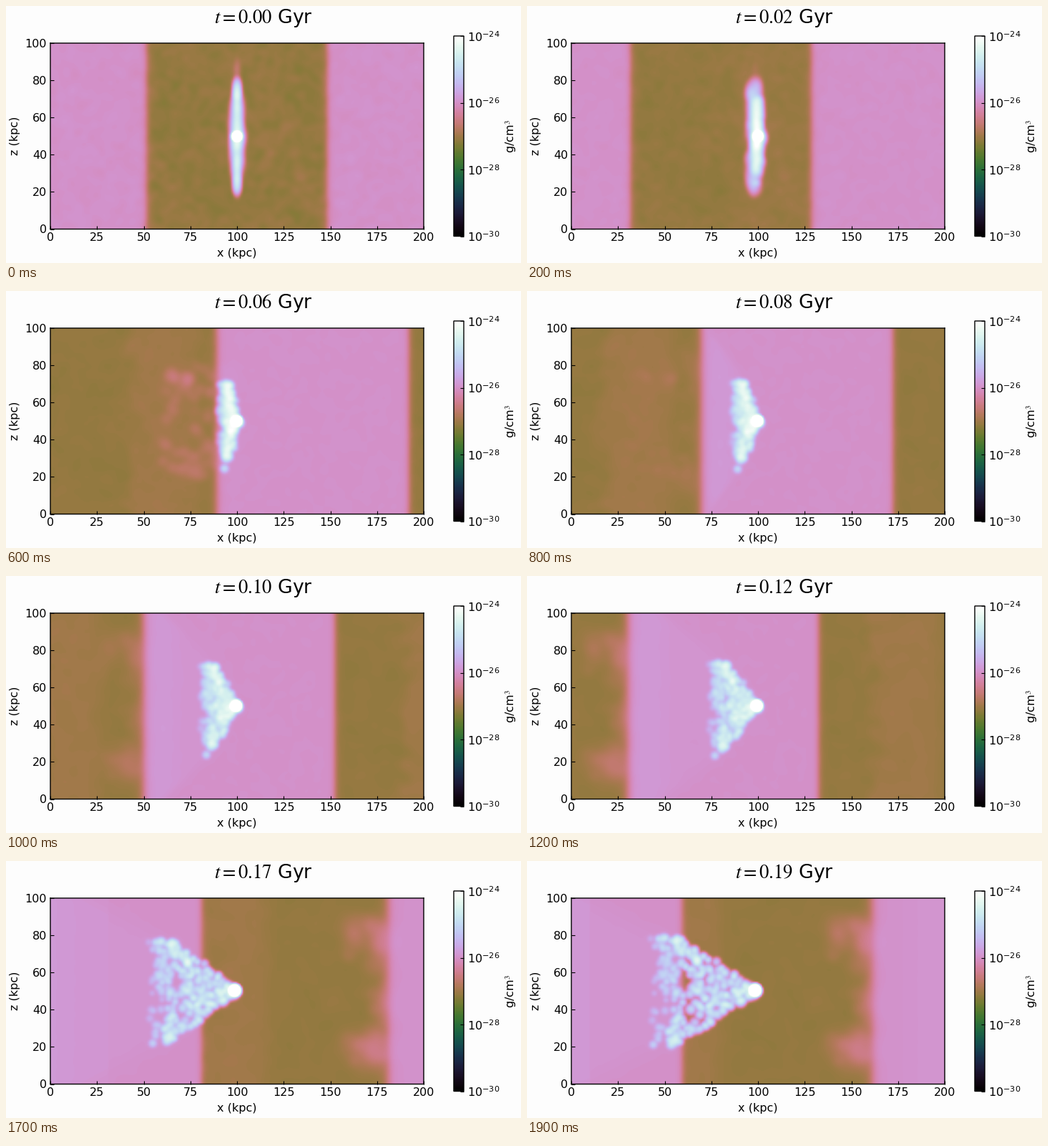
Write a matplotlib script that moves like this. It is 720x360 px and loops after 2 s.

```python
import numpy as np
import matplotlib.pyplot as plt
from matplotlib.animation import FuncAnimation
from matplotlib.cm import ScalarMappable
from matplotlib.colors import LogNorm

W, H, DPI = 720, 360, 100
FRAMES = 20
PINK, BROWN = -25.97, -27.1  # log10 densities of the two media

plt.rcParams.update({
    "font.family": "DejaVu Sans", "font.size": 11.5, "mathtext.fontset": "stix",
    "xtick.direction": "in", "ytick.direction": "in", "axes.linewidth": 1,
    "axes.labelpad": 4.5, "figure.facecolor": "#fdfdfd",
})

rng = np.random.default_rng(12)
xs = np.arange(200) + 0.5
zs = np.arange(100) + 0.5
X, Z = np.meshgrid(xs, zs)


def smooth_noise(passes):
    a = rng.normal(size=X.shape)
    for _ in range(passes):
        for axis in (0, 1):
            a = (np.roll(a, 1, axis) + a + np.roll(a, -1, axis)) / 3
    return a / a.std()


def step(v, width):
    return 0.5 * (1 + np.tanh(v / width))


def blobs(x, z, sx, sz, amp, wrap=False):
    """Sum of Gaussian clumps on the grid."""
    dx = xs - np.reshape(x, (-1, 1))
    if wrap:
        dx = (dx + 100) % 200 - 100
    dz = zs - np.reshape(z, (-1, 1))
    gx = np.exp(-0.5 * (dx / np.reshape(sx, (-1, 1))) ** 2)
    gz = np.exp(-0.5 * (dz / np.reshape(sz, (-1, 1))) ** 2)
    return (gz * np.reshape(amp, (-1, 1))).T @ gx


grain = smooth_noise(4)
mottle = smooth_noise(12)

# dense disc clumps
N = 260
h0 = 19.5 * rng.choice([-1, 1], N) * rng.random(N) ** 1.45
lag = rng.random(N) ** 1.3
x_off = rng.normal(0, 0.8, N)
size = rng.uniform(0.9, 1.3, N)
mass = rng.uniform(0.4, 1.6, N) * (1 - 0.85 * lag) * 1.1e-25

# outer gas that is stripped early
M = 90
out_h = rng.choice([-1, 1], M) * 28 * rng.random(M) ** 0.6
out_lag = rng.random(M)
out_mass = rng.uniform(0.5, 1.5, M) * 2.4e-26

# wisps ahead of the trailing edge: two long plumes and a short fringe
K = 90
plume = rng.random(K) < 0.55
wisp_z = np.where(plume, rng.choice([20, 80], K) + rng.normal(0, 5, K),
                  rng.uniform(14, 86, K))
wisp_x = 3 - np.where(plume, 24, 12) * rng.random(K) ** 1.4
wisp_s = rng.uniform(2.2, 4.8, K)


def medium(n):
    left = 51.5 - 9.9 * n - 4 * (n / 19) ** 6
    right = 148.3 - 9.85 * n
    mid, half = (left + right) / 2, (right - left) / 2
    c = (X - mid + 100) % 200 - 100
    brown = step(c + half, 1.9) - step(c - half, 1.9 + 0.06 * n)

    drift = np.roll(grain, -10 * n, axis=1)
    soft = np.roll(mottle, -10 * n, axis=1)
    c0 = 28 - 0.21 * n * n
    edge = c - c0 + 2 * soft
    warm = step(edge + 18, 4) - step(edge - 18, 4)
    low = BROWN + 0.1 * min(1, n / 4) * warm + 0.035 * drift * np.exp(-n / 4)
    low = low + 0.012 * soft

    # widening wake behind the disc
    front = 100 - 0.125 * n * n
    slope = 0.45 + 6 * np.exp(-n / 4)
    reach = 25 + (front - X) * slope
    wake = step(reach - np.abs(Z - 50), 3) * step(X - right - 2, 2)
    wake *= step(front - X, 3) * np.clip((n - 4) / 4, 0, 1)
    ridge = np.exp(-((X - right - 9 - 0.6 * (n - 8)) / (5 + 0.5 * n)) ** 2)
    high = PINK + 0.02 * drift * np.exp(-n / 5) + wake * (0.05 + 0.06 * ridge)
    high = high + 0.06 * np.clip((n - 14) / 5, 0, 1) * step(c - half - 18, 9)

    dens = 10 ** (low * brown + high * (1 - brown))
    gain = np.clip((n - 7) / 9, 0, 1)
    dens += blobs(right + wisp_x, wisp_z, wisp_s, wisp_s,
                  np.full(K, 2.8e-28 * gain), wrap=True)
    return dens


def galaxy(n):
    push = 0.125 * n * n
    u = np.abs(h0) / 20
    x = 100 + x_off - push * (u + (1 - u) * lag) - 0.6 * n * lag
    z = 50 + h0 * (1 + 0.0014 * n * n)
    start = min(1, n / 4)
    calm = 1 - start  # the disc is still smooth at first
    amp = mass * (0.12 + 0.88 * start) * (1 - 0.75 * calm * u ** 1.5)
    dens = blobs(x, z, size * (1 + 0.15 * calm), size * (1 + calm), amp)

    fade = np.exp(-0.7 * n)
    spread = np.full(M, 1 + 0.2 * min(n, 6))
    dens += blobs(100 - 1.1 * out_lag * n * n, 50 + out_h * (1 + 0.01 * n),
                  spread, spread * (1 + calm), out_mass * fade)
    dens += blobs(100 - 0.4 * n * n, 86, 1.2, 3.5, 1.2e-27 * fade)
    dens += blobs(100 - 0.152 * n * n - 0.3 * min(n, 4), 25 - 0.01 * n * n,
                  1.15, 1.15, 1.2e-25 * start / (1 + 0.05 * n))

    r = np.hypot(X - 100 + 0.0045 * n * n, Z - 50 - 0.025 * n)
    return dens + 1e-23 * np.exp(-(r / (2.3 + 0.018 * n)) ** 4)


def field(n):
    return np.log10(medium(n) + galaxy(n))


def box(x0, y0, x1, y1):
    return [x0 / W, 1 - y1 / H, (x1 - x0) / W, (y1 - y0) / H]


fig = plt.figure(figsize=(W / DPI, H / DPI), dpi=DPI)
ax = fig.add_axes(box(62, 52, 584, 312.5))
image = ax.imshow(field(0), origin="lower", extent=(0, 200, 0, 100),
                  aspect="auto", cmap="cubehelix", vmin=-30, vmax=-24,
                  interpolation="bilinear")
ax.set_xticks(range(0, 201, 25))
ax.set_yticks(range(0, 101, 20))
ax.set_xlabel("x (kpc)")
ax.set_ylabel("z (kpc)")

cax = fig.add_axes(box(626, 42, 640, 322.5))
bar = fig.colorbar(ScalarMappable(LogNorm(1e-30, 1e-24), "cubehelix"), cax=cax,
                   ticks=[1e-30, 1e-28, 1e-26, 1e-24])
bar.ax.minorticks_off()
bar.set_label("g/cm$^3$")
for edge in [*ax.spines.values(), bar.outline]:
    edge.set_snap(False)

title = fig.text(0.5, 1 - 24 / H, "", ha="center", va="baseline", fontsize=19.2)


def update(n):
    image.set_data(field(n))
    title.set_text(f"$t={n / 100:.2f}$ Gyr")
    return image, title


anim = FuncAnimation(fig, update, frames=FRAMES, interval=100, repeat=True)
plt.show()
```
